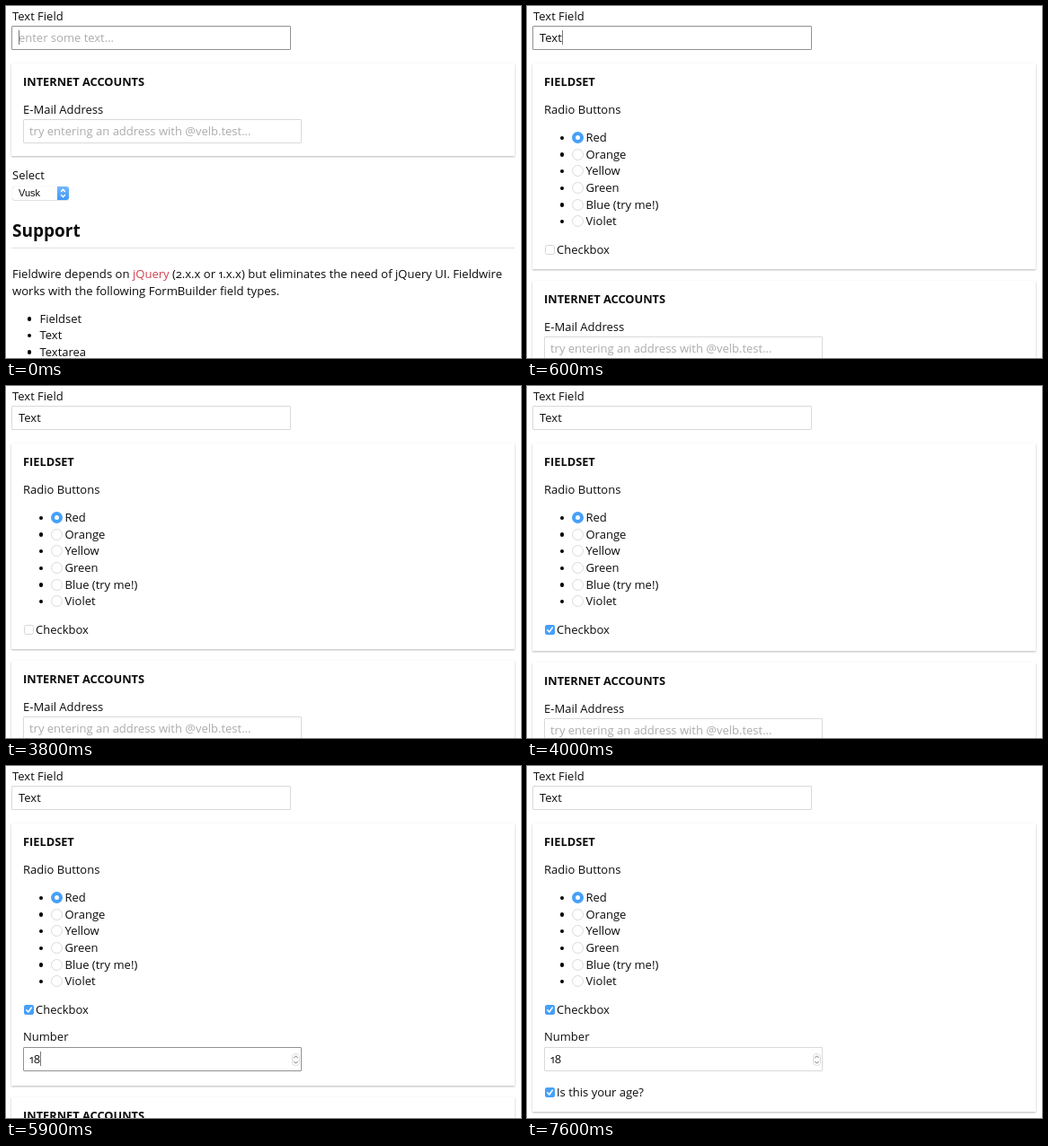
An HTML page for the animation above (8600 ms loop, 573x392 px).

```html
<!DOCTYPE html>
<html lang="en">
<head>
<meta charset="utf-8">
<title>Conditional form fields</title>
<style>
  html, body { margin: 0; width: 100%; height: 100%; overflow: hidden; background: #fff; }
  body { position: relative; font: 13px/18px "Open Sans", "Noto Sans", sans-serif; color: #0c0c0c; font-variant-numeric: oldstyle-nums; }
  div { position: absolute; box-sizing: border-box; white-space: pre; }
  .layer { left: 0; top: 0; width: 573px; height: 392px; }
  .row { left: 0; width: 560px; overflow: hidden; }
  .card { left: 6px; width: 560px; background: #fff; overflow: hidden; box-shadow: 0 1px 2px rgba(0, 0, 0, .28); }
  .bold { font-weight: 700; font-size: 12.8px; }
  .heading { font-weight: 700; font-size: 19px; }
  .para { font-size: 13.1px; }
  .para b { font-weight: 400; color: #cf4450; }
  .field { width: 311px; height: 27px; padding: 3px 7px 0; border: 1px solid; border-radius: 1px; background: #fff; }
  .card .field { width: 310px; padding-left: 6px; }
  .hint { color: #acacac; }
  .caret { position: absolute; width: 1px; height: 16px; margin-top: 1px; background: #777; }
  .dot { width: 4.5px; height: 4.5px; border-radius: 50%; background: #000; }
  .radio { width: 13px; height: 13px; border: 1px solid #dadada; border-radius: 50%; background: #fff; }
  .radio.on { border: 4px solid #46a0fa; }
  .check { width: 11px; height: 11px; border: 1px solid #d6d6d6; border-radius: 2.5px; background: #fff; }
  .tick { left: -1px; top: -1px; width: 11px; height: 11px; border-radius: 2.5px; background: #46a0fa; }
  .rule { left: 6px; top: 269px; width: 560px; height: 1px; background: #e2e2e2; }
  .select { left: 7px; top: 201px; width: 63px; height: 15px; border-radius: 3px; overflow: hidden; box-shadow: 0 0 1px rgba(0, 0, 0, .25), 0 1px 1px rgba(0, 0, 0, .1); background: #fff; font: 11px/15px "Liberation Sans", Arial, sans-serif; padding-left: 7px; }
  .knob { right: 0; top: 0; width: 13px; height: 15px; background: linear-gradient(#74b8fb, #3f97f8); }
  .spin { right: 1px; top: 6px; width: 9px; height: 14px; border: 1px solid #dedede; border-radius: 4px; }
  svg { position: absolute; left: 0; top: 0; fill: none; stroke-linecap: round; stroke-linejoin: round; }
</style>
</head>
<body>
<script>
const LOOP = 8600, STEP = 100;

function box(parent, cls, x, y, html = "") {
  const el = document.createElement("div");
  el.className = cls;
  if (x !== undefined) el.style.left = x + "px";
  if (y !== undefined) el.style.top = y + "px";
  el.innerHTML = html;
  parent.append(el);
  return el;
}

// y is the baseline
const text = (parent, x, y, html, cls = "") => box(parent, cls, x, y - 14, html);

const arrows = (w, h, color, width) => {
  const m = w / 2, c = h / 2;
  return `<svg width="${w}" height="${h}" stroke="${color}" stroke-width="${width}">` +
    `<path d="M${m - 2} ${c - 2}l2 -2.2l2 2.2M${m - 2} ${c + 2}l2 2.2l2 -2.2"/></svg>`;
};

function field(parent, x, y, hint) {
  const el = box(parent, "field", x, y,
    `<span></span><i class="caret"></i><span class="hint">${hint}</span>`);
  const [value, caret, label] = el.children;
  return {
    el,
    set(str, focus, blink) {
      const g = Math.round(217 - 72 * focus);
      el.style.borderColor = `rgb(${g},${g},${g})`;
      value.textContent = str;
      label.style.display = str ? "none" : "";
      caret.style.display = blink ? "" : "none";
    }
  };
}

function checkbox(parent, x, y, label) {
  const el = box(parent, "check", x, y);
  text(parent, x + 13, y + 10, label);
  return box(el, "tick", undefined, undefined,
    '<svg width="11" height="11" stroke="#fff" stroke-width="1.5"><path d="M2.8 5.8l2 2.2l3.5 -5"/></svg>');
}

const page = document.body;

text(page, 7, 16, "Text Field");
const name = field(page, 6, 22, "enter some text...");

// Lower part of the page, pushed down by the opening fieldset
const rest = box(page, "layer");
const mail = box(rest, "card", 6, 64);
mail.style.height = "103px";
text(mail, 13, 25, "INTERNET ACCOUNTS", "bold");
text(mail, 13, 56, "E-Mail Address");
field(mail, 13, 62, "try entering an address with @velb.test...").set("", 0, false);

text(rest, 7, 193, "Select");
const select = box(rest, "select", undefined, undefined, "Vusk");
box(select, "knob", undefined, undefined, arrows(13, 15, "#fff", 1.3));
text(rest, 7, 254.5, "Support", "heading");
box(rest, "rule");
text(rest, 7, 303, "Fieldwire depends on <b>jQuery</b> (2.x.x or 1.x.x) but eliminates the need of jQuery UI. Fieldwire", "para");
text(rest, 7, 321.5, "works with the following FormBuilder field types.", "para");
["Fieldset", "Text", "Textarea"].forEach((item, i) => {
  const y = 352.5 + i * 18.67;
  box(rest, "dot", 23.5, y - 6.5);
  text(rest, 37.5, y, item);
});

// Conditional fieldset; inner positions are relative to its corner
const group = box(page, "card", 6, 64);
text(group, 13, 25, "FIELDSET", "bold");
text(group, 13, 56, "Radio Buttons");
["Red", "Orange", "Yellow", "Green", "Blue (try me!)", "Violet"].forEach((item, i) => {
  const y = 87 + i * 18.67;
  box(group, "dot", 30.5, y - 6.5);
  box(group, i ? "radio" : "radio on", 44, y - 11);
  text(group, 59.5, y, item);
});
const showNumber = checkbox(group, 14, 202, "Checkbox");

const numberRow = box(group, "row");
text(numberRow, 13, 13, "Number");
const number = field(numberRow, 13, 20, "try 10-149");
box(number.el, "spin", undefined, undefined, arrows(7, 12, "#777", 1));

const ageRow = box(group, "row", 0, 289);
const isAge = checkbox(ageRow, 14, 4.5, "Is this your age?");

const ramp = (t, from, to) => Math.min(1, Math.max(0, (t - from) / (to - from)));
const slide = (t, from) => 0.5 - Math.cos(ramp(t, from, from + 400) * Math.PI) / 2;
const within = (t, a, b) => t >= a && t < b;
const typed = (t, str, times) => str.slice(0, times.filter(at => t >= at).length);

function draw(t) {
  const open = slide(t, 150), num = slide(t, 3955), age = slide(t, 5900);

  name.set(typed(t, "Text", [100, 200, 300, 400]), 1 - ramp(t, 2050, 2400),
    t < 1100 || within(t, 1600, 2100));

  const height = 229 * open + 63 * num + 29 * age;
  group.style.display = open ? "" : "none";
  group.style.height = height + "px";
  rest.style.transform = `translateY(${height + 13 * open}px)`;

  showNumber.style.opacity = ramp(t, 3800, 4000);
  numberRow.style.top = 216 + 13 * num + "px";
  numberRow.style.height = 50 * num + "px";
  number.set(typed(t, "18", [5700, 5900]), t < 4700 ? 0 : 1 - ramp(t, 5950, 6300),
    within(t, 4700, 5200) || within(t, 5700, 6100));

  ageRow.style.height = 19 * age + "px";
  isAge.style.opacity = ramp(t, 7200, 7600);
}

const start = performance.now();
function tick() {
  const t = (performance.now() - start) % LOOP;
  draw(Math.floor(t / STEP) * STEP);
  requestAnimationFrame(tick);
}
tick();
</script>
</body>
</html>
```
